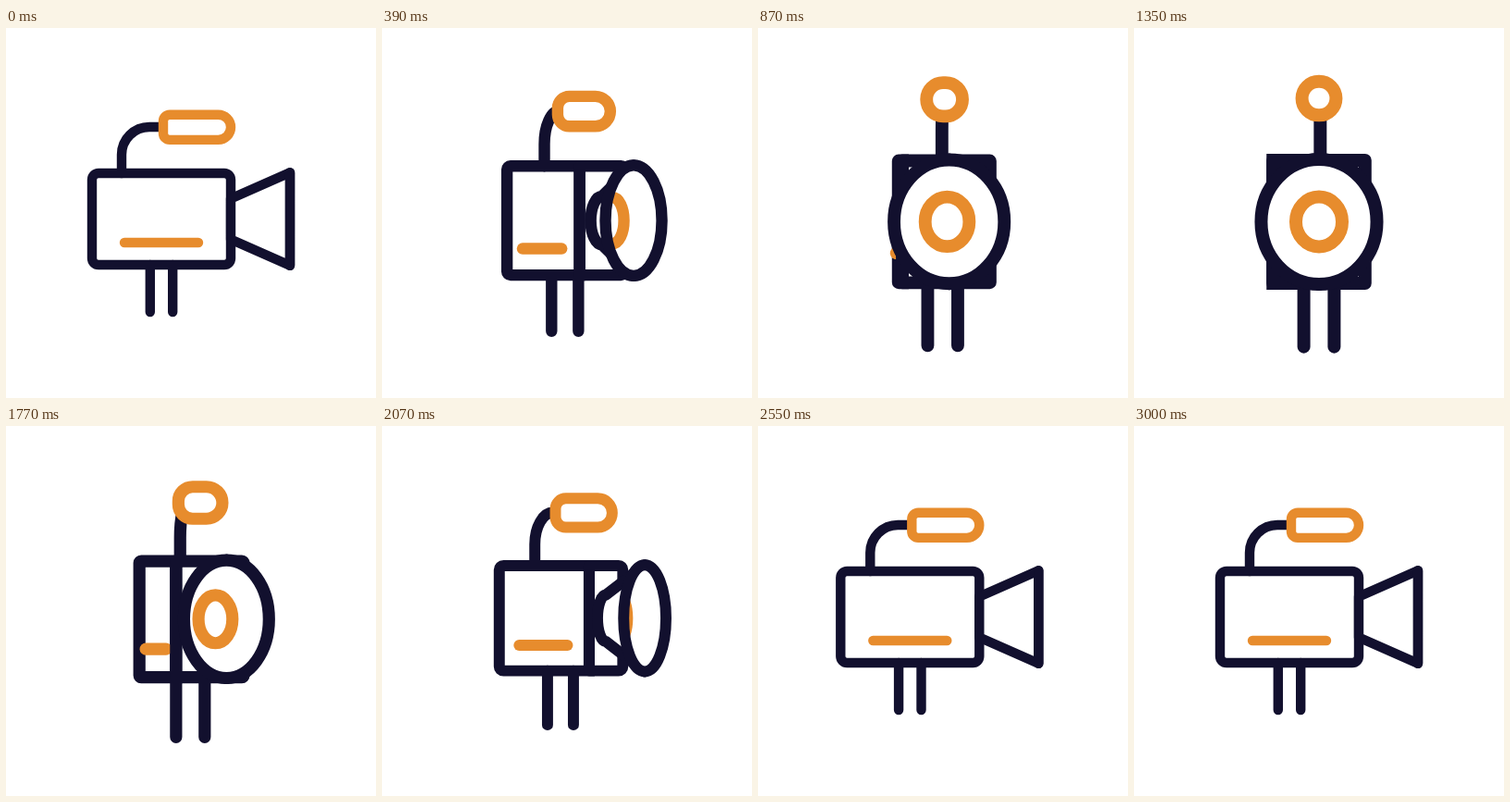
An HTML page for the animation above (5.03 s loop, 400 by 400 pixels).

```html
<!DOCTYPE html>
<html lang="en">
<head>
<meta charset="utf-8">
<title>Turning camera</title>
<style>
  html, body { margin: 0; width: 100%; height: 100%; overflow: hidden; background: #fff; }
  svg { display: block; width: 100%; height: 100%; }
  #camera { fill: none; stroke: #12102e; stroke-width: 10.4; stroke-linecap: round; stroke-linejoin: round; }
  #camera .accent { stroke: #e78c2d; }
  #camera .solid { fill: #fff; }
  #side { stroke-linejoin: miter; }
</style>
</head>
<body>
<svg viewBox="0 0 400 400">
  <clipPath id="mouth"><ellipse id="mouthShape" ry="50.2"/></clipPath>
  <g id="camera">
    <path d="M-12.2 49.5V100.5M12.2 49.5V100.5"/>
    <path id="arm"/>
    <path id="side"/>
    <path id="line" class="accent"/>
    <path id="front"/>
    <path id="cone" class="solid"/>
    <ellipse id="glass" ry="50.2" fill="#fff" stroke="none"/>
    <g clip-path="url(#mouth)"><ellipse id="ring" class="accent"/></g>
    <ellipse id="rim" ry="50.2"/>
    <path id="mic" class="accent solid"/>
  </g>
</svg>
<script>
const LOOP = 5030;
const el = {};
document.querySelectorAll('[id]').forEach(node => { el[node.id] = node; });

// [time, value]: 0 is the side view, 1 the front view
const TURN = [[0, 0], [160, .2], [390, .55], [540, .765], [870, .962], [1080, 1],
  [1350, 1], [1620, .915], [2070, .43], [2160, .215], [2250, .045], [2320, 0]];

// [time, x of the tripod]
const SLIDE = [[0, 168], [160, 188.5], [390, 197.8], [540, 199.3], [870, 199.7],
  [1350, 200], [1620, 200], [1880, 198], [2070, 193], [2160, 182], [2250, 173],
  [2340, 167.5], [2450, 164.8], [2550, 164.3], [2700, 165.2], [3000, 168]];

const lerp = (a, b, p) => a + (b - a) * p;

function slope(keys, i) {
  const a = keys[i - 1], k = keys[i], b = keys[i + 1];
  if (!a || !b || (k[1] - a[1]) * (b[1] - k[1]) <= 0) return 0;
  return (b[1] - a[1]) / (b[0] - a[0]);
}

// Smooth curve through the keys, flat at its turning points
function track(keys, t) {
  const last = keys.length - 1;
  if (t >= keys[last][0]) return keys[last][1];
  let i = 0;
  while (t >= keys[i + 1][0]) i++;
  const [t0, v0] = keys[i], [t1, v1] = keys[i + 1];
  const d = t1 - t0, u = (t - t0) / d, w = 1 - u;
  return v0 * w * w * (1 + 2 * u) + v1 * u * u * (3 - 2 * u)
    + d * u * w * (w * slope(keys, i) - u * slope(keys, i + 1));
}

// Box with separate corner radii on its left and right
function panel(x0, x1, y0, y1, left, right) {
  const corner = (r, x, y) => r > .01 ? `A${r} ${r} 0 0 1 ${x} ${y}` : '';
  return `M${x0 + left} ${y0}H${x1 - right}${corner(right, x1, y0 + right)}` +
    `V${y1 - right}${corner(right, x1 - right, y1)}` +
    `H${x0 + left}${corner(left, x0, y1 - left)}` +
    `V${y0 + left}${corner(left, x0 + left, y0)}Z`;
}

function set(node, attrs) {
  for (const name in attrs) node.setAttribute(name, attrs[name]);
}

function draw(t) {
  const s = track(TURN, t);
  const mix = (a, b) => lerp(a, b, s);
  const path = (name, d) => el[name].setAttribute('d', d);

  el.camera.setAttribute('transform',
    `translate(${track(SLIDE, t)} ${mix(206.5, 209.5)}) scale(${mix(1, 1.345)})`);

  const edge = mix(75, -37), right = mix(75, 37), round = mix(7, 0);
  const inner = 7 * Math.max(0, 1 - 8 * s);
  const left = mix(-75, -34.5);
  path('side', panel(Math.min(left, edge), Math.max(left, edge), -49.5, 49.5, round, inner));
  path('front', s > .01 ? panel(edge, right, -49.5, 49.5, 0, Math.min(round, right - edge)) : '');
  path('line', `M${mix(-40, -37.4)} 25.5H${mix(40, -38)}`);

  const lens = mix(139, 0), base = mix(75, 0);
  path('cone', `M${base} -22L${lens} -50.2V50.2L${base} 22A${18.6 * s} 22 0 0 1 ${base} -22Z`);
  const mouth = { cx: lens, rx: Math.max(.01, 46.5 * s) };
  [el.mouthShape, el.glass, el.rim].forEach(node => set(node, mouth));
  set(el.ring, { cx: mix(96.5, 0), rx: Math.max(.01, 18.6 * s), ry: mix(22, 20) });

  const arm = mix(-43, 1), bend = 30 * (1 - s);
  path('arm', `M${arm} -49.5V-69.5A${bend} 30 0 0 1 ${arm + bend} -99.5H${mix(2, 1)}`);
  path('mic', panel(mix(2, -13.7), mix(75, 13.7), -112.8, -85.6, mix(7, 13.6), 13.6));
}

function frame() {
  draw(performance.now() % LOOP);
  requestAnimationFrame(frame);
}
frame();
</script>
</body>
</html>
```
